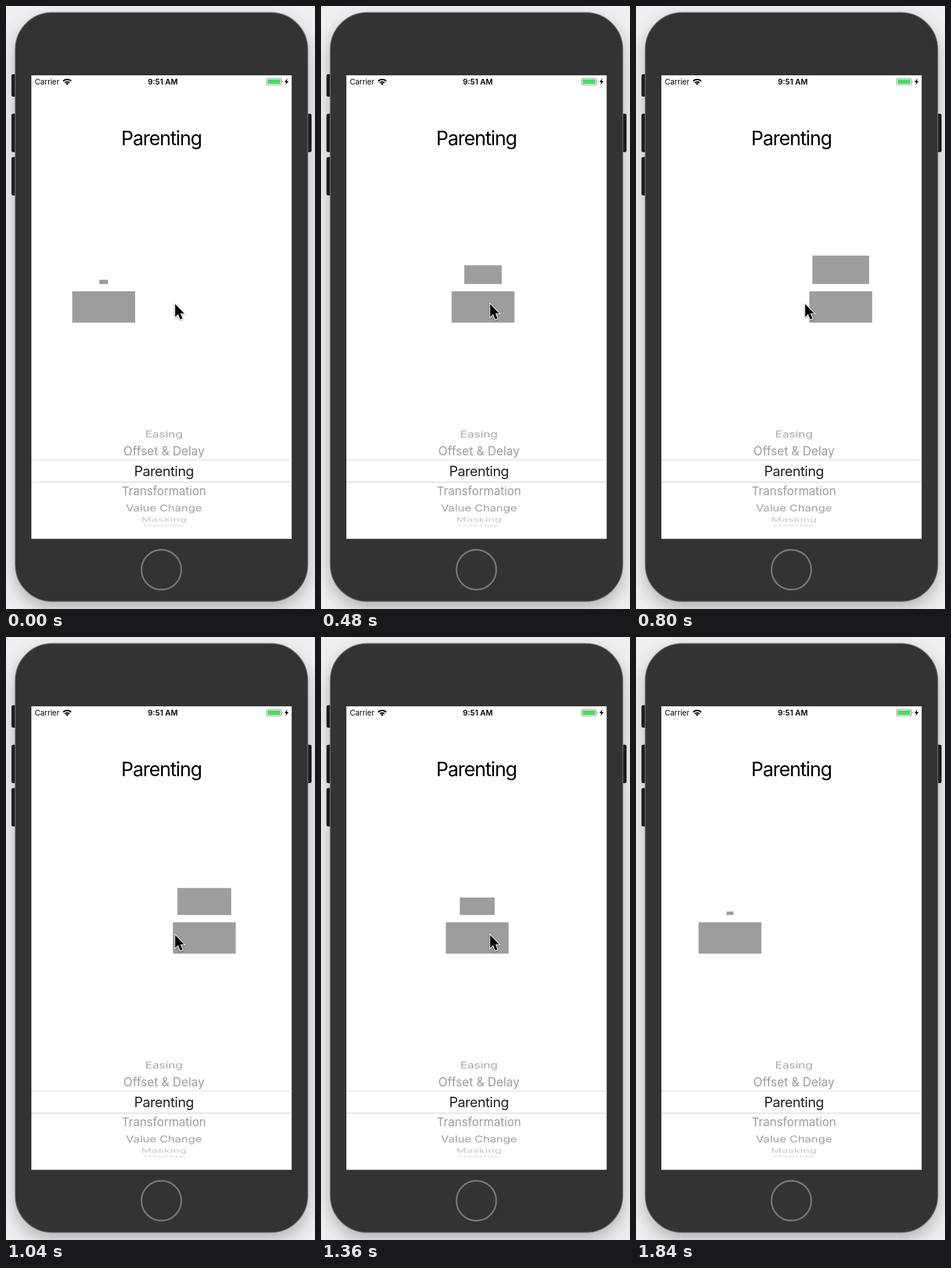
Recreate the animation shown at these times as an HTML page. Size 536 by 1044 pixels, loop 1920 ms.

```html
<!DOCTYPE html>
<html lang="en">
<head>
<meta charset="utf-8">
<title>Parenting</title>
<style>
  html, body { margin: 0; width: 100%; height: 100%; overflow: hidden; background: #efefef; }
  svg { display: block; width: 536px; height: 1044px; }
  text { font-family: Inter, Roboto, sans-serif; font-optical-sizing: none; }
  .body { filter: drop-shadow(0 12px 14px rgba(0, 0, 0, .24)); }
  .cursor { filter: drop-shadow(0 1.5px 1.5px rgba(0, 0, 0, .4)); }
</style>
</head>
<body>
<svg viewBox="0 0 536 1044">
  <g fill="#202020">
    <rect x="9.5" y="118" width="12" height="39" rx="3"/>
    <rect x="9.5" y="186.5" width="12" height="66.5" rx="3"/>
    <rect x="9.5" y="261.5" width="12" height="66.5" rx="3"/>
    <rect x="518" y="186.5" width="12" height="66.5" rx="3"/>
  </g>
  <rect class="body" x="16" y="11.2" width="507.5" height="1019.8" rx="64" fill="#333" stroke="#707070" stroke-width="1.4"/>
  <circle cx="269.5" cy="976" r="34.5" fill="none" stroke="#777" stroke-width="2.8"/>
  <rect x="44" y="120" width="451.5" height="802.5" fill="#fff"/>

  <!-- status bar -->
  <text x="50" y="136" font-size="13">Carrier</text>
  <text x="272" y="136" font-size="13.3" font-weight="600" text-anchor="middle">9:51 AM</text>
  <g fill="none" stroke="#000" stroke-width="2.3">
    <path d="M99.2 130.1a9.7 9.7 0 0 1 13.8 0"/>
    <path d="M102 133a5.8 5.8 0 0 1 8.2 0"/>
  </g>
  <path d="M106.1 137l-2.4-2.5a3.4 3.4 0 0 1 4.8 0z"/>
  <rect x="452" y="125.2" width="25.5" height="11.6" rx="2.6" fill="#fff" stroke="#999" stroke-width="1.1"/>
  <rect x="453.8" y="127" width="22" height="8" rx="1.2" fill="#4cd964"/>
  <path d="M478.7 129v4a2.2 2.2 0 0 0 0-4z" fill="#999"/>
  <path d="M488.3 125l-5.3 6.8h3.3l-1.6 5.2 5.5-7h-3.4z"/>

  <text x="269.5" y="241" font-size="33.5" letter-spacing="-1.3" text-anchor="middle">Parenting</text>

  <g id="picker" text-anchor="middle"></g>
  <path d="M44 786H495.5M44 824.3H495.5" stroke="#d4d4d4" stroke-width="1.2"/>

  <g fill="#9d9d9d">
    <rect id="parent" y="494" width="109" height="54.2"/>
    <rect id="child"/>
  </g>
  <path id="cursor" class="cursor" d="M293.4 516V538.4L298.5 533.6 302.3 542.6 306.2 541 302.4 532.2H309.2Z" stroke="#fff" stroke-width="2.4" paint-order="stroke"/>
</svg>
<script>
  const LOOP = 1920, STEP = 80;
  const byId = id => document.getElementById(id);

  // label, baseline, font size, vertical squeeze, colour, tracking
  const rows = [
    ['Easing', 747, 20.8, .74, '#a8a8a8', 0],
    ['Offset & Delay', 778.3, 20.9, 1, '#9c9c9c', 0],
    ['Parenting', 814, 24, 1, '#202020', -.5],
    ['Transformation', 847, 20.4, 1, '#9c9c9c', 0],
    ['Value Change', 874.5, 20.1, .82, '#a0a0a0', 0],
    ['Masking', 893, 19.8, .55, '#c6c6c6', 0],
    ['Overlay', 900.8, 19.8, .22, '#d4d4d4', 0]
  ];
  for (const [label, y, size, squeeze, fill, tracking] of rows) {
    const row = document.createElementNS('http://www.w3.org/2000/svg', 'text');
    row.textContent = label;
    setAttrs(row, {
      transform: `translate(274 ${y}) scale(1 ${squeeze})`,
      'font-size': size, 'letter-spacing': tracking, fill
    });
    byId('picker').append(row);
  }

  // time, left edge of the parent
  const path = [[0, 115], [320, 187.5], [560, 246], [640, 263.5], [896, 323],
    [1040, 289.5], [1120, 272], [1200, 252.5], [1520, 180.5], [1680, 141.3], [1840, 108.5]];

  function setAttrs(el, attrs) {
    for (const name in attrs) el.setAttribute(name, attrs[name]);
  }

  function leftAt(t) {
    const i = Math.max(1, path.findIndex(([time]) => time >= t));
    const [t0, x0] = path[i - 1], [t1, x1] = path[i];
    return x0 + (x1 - x0) * (t - t0) / (t1 - t0);
  }

  function draw(t) {
    const x = leftAt(t);
    const width = .45 * (x - 82);
    const height = width / 2;
    setAttrs(byId('parent'), { x });
    setAttrs(byId('child'), { x: x + 54.5 - width / 2, y: 481.3 - height, width, height });
    // the pointer flicks away up and to the left
    const flick = t >= 1600 ? -180 : 0;
    setAttrs(byId('cursor'), {
      transform: `translate(${flick} ${flick})`,
      visibility: t > 1600 ? 'hidden' : 'visible'
    });
  }

  const start = performance.now();
  function tick() {
    const t = (performance.now() - start) % LOOP;
    draw(Math.floor(t / STEP) * STEP);
    requestAnimationFrame(tick);
  }
  tick();
</script>
</body>
</html>
```
